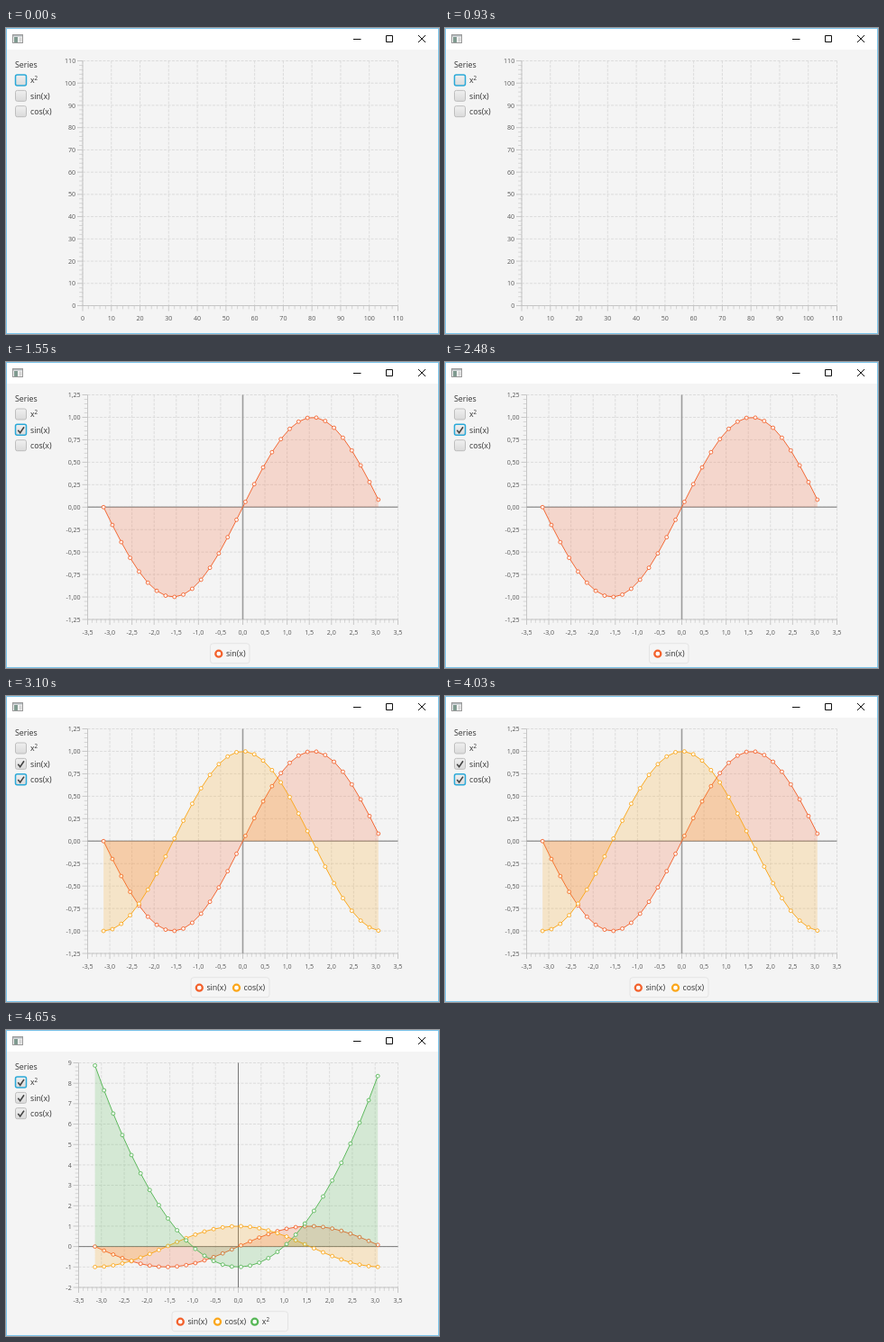
Write an HTML page that moves like this. It is 480 px wide and 340 px high and loops after 6200 ms.

```html
<!DOCTYPE html>
<html lang="en">
<head>
<meta charset="utf-8">
<title>Series chart</title>
<style>
html, body { margin: 0; width: 100%; height: 100%; overflow: hidden; background: #f4f4f4; }
svg { display: block; width: 480px; height: 340px; font-family: "Open Sans", "Noto Sans", sans-serif; }
text { font-size: 8.8px; fill: #333; }
.sup { font-size: 6.2px; }
.tick { font-size: 7.1px; fill: #585858; }
.grid { stroke: #dadada; stroke-width: .9; stroke-dasharray: 3 1.5; }
.axis { stroke: #c2c2c2; stroke-width: .9; }
.minor { stroke: #cacaca; stroke-width: .75; }
.scene { visibility: hidden; animation: show 6200ms step-end infinite; }
@keyframes show {
  0% { visibility: visible; }
  25%, 100% { visibility: hidden; }
}
</style>
</head>
<body>
<svg viewBox="0 0 480 340">
  <defs>
    <linearGradient id="box" x1="0" y1="0" x2="0" y2="1">
      <stop offset="0" stop-color="#f0f0f0"/>
      <stop offset="1" stop-color="#dadada"/>
    </linearGradient>
  </defs>
  <rect width="480" height="340" fill="#f4f4f4"/>
  <rect width="480" height="24" fill="#fff"/>
  <rect x=".5" y=".5" width="479" height="339" fill="none" stroke="#7cc4ea"/>
  <g id="icon">
    <rect x="7.5" y="7.5" width="11" height="9" fill="#f3f3f3" stroke="#9a9a9a"/>
    <rect x="8" y="8" width="10" height="1.5" fill="#b5bcc0"/>
    <rect x="9" y="10" width="4" height="6" fill="#7f9a90"/>
    <rect x="14.5" y="10.5" width="3" height="5" fill="#d5d5d5"/>
  </g>
  <path d="M385 12.5h8.5M421.5 8.5h7v7h-7zM457 8l8 8M465 8l-8 8" fill="none" stroke="#111"/>
  <text x="10" y="44">Series</text>
  <g id="stage"></g>
</svg>
<script>
const series = {
  sin: { label: 'sin(x)', color: '#f3622d', fn: Math.sin },
  cos: { label: 'cos(x)', color: '#fba71b', fn: Math.cos },
  sq: { label: 'x<tspan class="sup" dy="-3">2</tspan>', color: '#57b757', fn: x => x * x - 1 }
};
const boxes = ['sq', 'sin', 'cos'];
const plotRight = 434.5, plotTop = 36.5;

const trig = {
  left: 90.5, bottom: 286,
  x: { min: -3.5, max: 3.5, step: .5, digits: 1 },
  y: { min: -1.25, max: 1.25, step: .25, digits: 2 },
  zero: { color: '#9c9c9c', width: 1.6 }
};
const scenes = [
  { left: 85, bottom: 308.5,
    x: { min: 0, max: 110, step: 10, digits: 0 },
    y: { min: 0, max: 110, step: 10, digits: 0 },
    on: [], focus: 'sq' },
  { ...trig, on: ['sin'], focus: 'sin', legend: [226.5, 270] },
  { ...trig, on: ['sin', 'cos'], focus: 'cos', legend: [205, 292] },
  { left: 80.5, bottom: 286, x: trig.x,
    y: { min: -2, max: 9, step: 1, digits: 0 },
    zero: { color: '#777', width: 1 },
    on: ['sin', 'cos', 'sq'], focus: 'sq', legend: [184, 312.5] }
];

const n = v => +v.toFixed(2);
const line = (x1, y1, x2, y2, attrs) =>
  `<line x1="${n(x1)}" y1="${n(y1)}" x2="${n(x2)}" y2="${n(y2)}" ${attrs}/>`;
const label = (x, y, text, anchor) =>
  `<text class="tick" x="${n(x)}" y="${n(y)}" text-anchor="${anchor}">${text}</text>`;
const dot = (x, y, r, color, width) =>
  `<circle cx="${n(x)}" cy="${n(y)}" r="${r}" fill="#fff" stroke="${color}" stroke-width="${width}"/>`;

// Calls draw for every minor and major tick, five per labelled step.
function ticks(axis, draw) {
  const count = Math.round((axis.max - axis.min) / axis.step) * 5;
  for (let i = 0; i <= count; i++) {
    const v = n(axis.min + i * axis.step / 5);
    draw(v, i % 5 === 0, v.toFixed(axis.digits).replace('.', ','));
  }
}

function drawAxes(s, px, py) {
  let grid = '', marks = '';
  ticks(s.x, (v, major, text) => {
    const x = px(v);
    marks += line(x, s.bottom, x, s.bottom + (major ? 6 : 3.8), `class="${major ? 'axis' : 'minor'}"`);
    if (!major) return;
    grid += line(x, plotTop, x, s.bottom, 'class="grid"');
    marks += label(x, s.bottom + 16.7, text, 'middle');
  });
  ticks(s.y, (v, major, text) => {
    const y = py(v);
    marks += line(s.left - (major ? 6 : 3.8), y, s.left, y, `class="${major ? 'axis' : 'minor'}"`);
    if (!major) return;
    grid += line(s.left, y, plotRight, y, 'class="grid"');
    marks += label(s.left - 7.8, y + 2.6, text, 'end');
  });
  marks += line(s.left, plotTop, s.left, s.bottom, 'class="axis"');
  marks += line(s.left, s.bottom, plotRight, s.bottom, 'class="axis"');
  if (s.zero) {
    const style = `stroke="${s.zero.color}" stroke-width="${s.zero.width}"`;
    marks += line(px(0), plotTop, px(0), s.bottom, style) + line(s.left, py(0), plotRight, py(0), style);
  }
  return grid + marks;
}

function drawCurve({ fn, color }, px, py) {
  const pts = Array.from({ length: 32 }, (_, i) => {
    const x = -Math.PI + i * .2;
    return [n(px(x)), n(py(fn(x)))];
  });
  const path = pts.join(' '), base = n(py(0));
  return `<polygon points="${pts[0][0]},${base} ${path} ${pts[31][0]},${base}" fill="${color}" fill-opacity=".2"/>` +
    `<polyline points="${path}" fill="none" stroke="${color}" stroke-width=".95"/>` +
    pts.map(([x, y]) => dot(x, y, 1.95, color, .9)).join('');
}

function drawLegend(s) {
  if (!s.legend) return '';
  const [a, b] = s.legend;
  let out = `<rect x="${a}" y="312.8" width="${b - a}" height="22" rx="3" fill="#f5f5f5" stroke="#e2e2e2" stroke-width=".9"/>`;
  s.on.forEach((key, i) => {
    const x = a + 9.3 + i * 41.2;
    out += dot(x, 324.2, 3.5, series[key].color, 2.3) +
      `<text x="${n(x + 8.1)}" y="327.4">${series[key].label}</text>`;
  });
  return out;
}

function drawBox(s, key, i) {
  const y = n(58 + i * 17.35), focus = s.focus === key;
  const edge = focus ? 'stroke="#2ba9d8" stroke-width="1.5"' : 'stroke="#b9b9b9" stroke-width=".9"';
  const check = s.on.includes(key)
    ? `<path d="M13.3 ${n(y + .3)}l2.4 3l4.3-6.4" fill="none" stroke="#444" stroke-width="1.6"/>` : '';
  return `<rect x="10.5" y="${n(y - 6)}" width="12" height="12" rx="2" fill="url(#box)" ${edge}/>` + check +
    `<text x="27" y="${n(y + 3.3)}">${series[key].label}</text>`;
}

document.getElementById('stage').innerHTML = scenes.map((s, i) => {
  const px = v => s.left + (v - s.x.min) / (s.x.max - s.x.min) * (plotRight - s.left);
  const py = v => s.bottom - (v - s.y.min) / (s.y.max - s.y.min) * (s.bottom - plotTop);
  return `<g class="scene" style="animation-delay:${i * 1550 - 6200}ms">` +
    drawAxes(s, px, py) +
    s.on.map(key => drawCurve(series[key], px, py)).join('') +
    drawLegend(s) +
    boxes.map((key, k) => drawBox(s, key, k)).join('') + '</g>';
}).join('');
</script>
</body>
</html>
```
